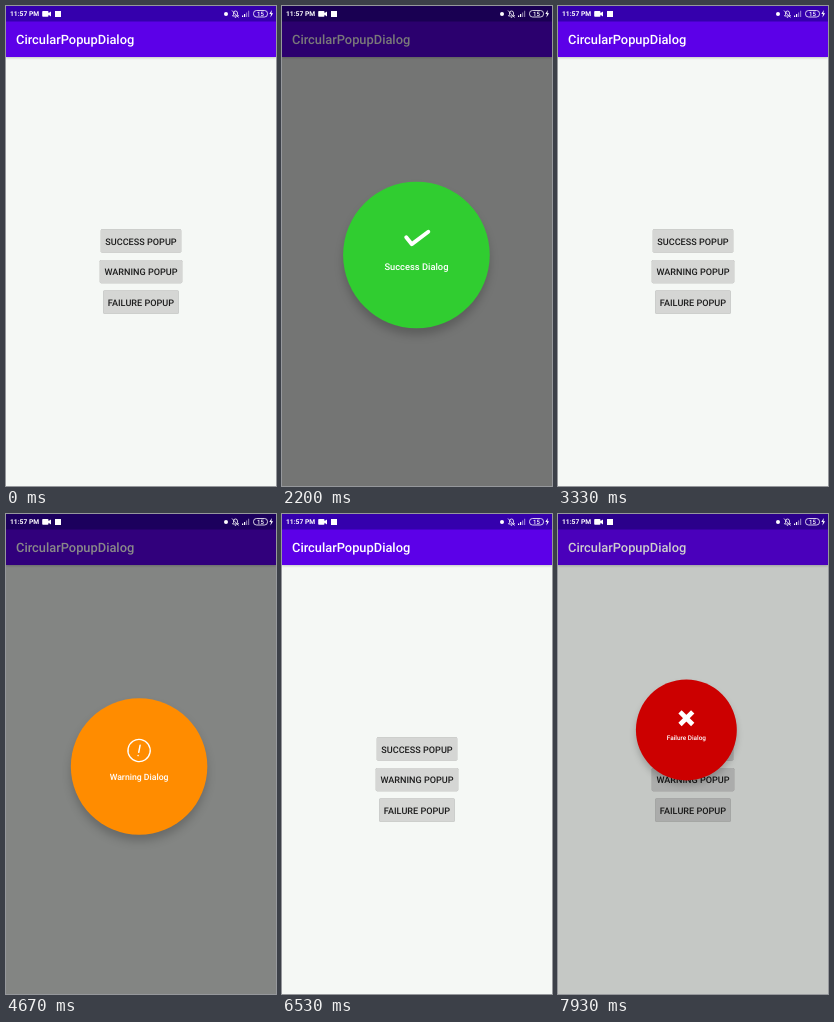
These frames come from a looping animation (270 by 480 pixels, 8000 ms). An HTML page:

```html
<!DOCTYPE html>
<html lang="en">
<head>
<meta charset="utf-8">
<title>Circular popup dialogs</title>
<style>
  html, body { margin: 0; width: 100%; height: 100%; overflow: hidden; background: #f5f8f5; }
  svg { display: block; width: 100%; height: 100%; font-family: Roboto, sans-serif; font-weight: 500; text-rendering: geometricPrecision; }
  .button rect { fill: #d5d6d4; filter: drop-shadow(0 .7px .7px rgba(0, 0, 0, .35)); }
  .button text { font-size: 9.1px; fill: #1c1c1c; text-anchor: middle; }
  .bar { filter: drop-shadow(0 1px 1px rgba(0, 0, 0, .2)); }
  .disc { filter: drop-shadow(0 7px 4.5px rgba(0, 0, 0, .2)); }
  .dialog text { font-size: 9.6px; fill: #fff; text-anchor: middle; }
  .line { fill: none; stroke: #fff; }
</style>
</head>
<body>
<svg viewBox="0 0 270 480">
  <rect width="270" height="480" fill="#f5f8f5"/>
  <rect class="bar" y="15" width="270" height="36" fill="#5c00e8"/>
  <rect width="270" height="15.500" fill="#3500ad"/>
  <text x="10" y="38" font-size="12.850" fill="#fff">CircularPopupDialog</text>
  <g id="buttons"></g>
  <rect id="dim" width="270" height="480" opacity="0"/>

  <g id="status" fill="#fff">
    <text x="4" y="10.300" font-size="6.700" font-weight="700">11:57 PM</text>
    <path d="M37 5h4.500q1 0 1 1v1l2.500-1.600v5l-2.500-1.600v1q0 1-1 1H37q-.8 0-.8-.8V5.800q0-.8.8-.8z"/>
    <rect x="49" y="5" width="6" height="6"/>
    <circle cx="220" cy="8" r="2"/>
    <path class="line" stroke-width=".8" d="M226.500 10h6l-1-1.500V7q0-2-2-2t-2 2v1.500zM228.800 11.300h1.400M226 4.500l6.500 7"/>
    <path d="M236 9.500h1.200V11H236zM238 8h1.200v3H238z"/>
    <path opacity=".45" d="M240 6.500h1.200V11H240zM242 4.800h1.200V11H242z"/>
    <rect class="line" x="247.500" y="4.500" width="14" height="6.500" rx="3" stroke-width=".8"/>
    <text x="254.500" y="10" font-size="6" text-anchor="middle">15</text>
    <path d="M265.800 4l-2.500 4h1.700l-.6 3.500 2.700-4.300h-1.700z"/>
  </g>

  <g class="dialog" visibility="hidden">
    <circle class="disc" r="75.500" fill="#30cd30"/>
    <g class="icon"><path class="line" stroke-width="4" stroke-linecap="round" stroke-linejoin="round" d="M-10.500 .5L-4 7L11.500-7.500"/></g>
    <text y="15.400">Success Dialog</text>
  </g>
  <g class="dialog" visibility="hidden">
    <circle class="disc" r="75.500" fill="#ff8c00"/>
    <g class="icon">
      <circle class="line" r="12.300" stroke-width="1.500"/>
      <path class="line" stroke-width="1.600" stroke-linecap="round" d="M0-6V2M0 5.700v.1"/>
    </g>
    <text y="15.400">Warning Dialog</text>
  </g>
  <g class="dialog" visibility="hidden">
    <circle class="disc" r="75.500" fill="#cc0000"/>
    <g class="icon"><path class="line" stroke-width="7" d="M-9.500-9.500l19 19M-9.500 9.500l19-19"/></g>
    <text y="15.400">Failure Dialog</text>
  </g>
</svg>
<script>
const LOOP = 8000, ENTER = 300, EXIT = 415;
const popups = [
  { enter: 1952, exit: 2715 },
  { enter: 4464, exit: 5247 },
  { enter: 6903, exit: 7692 },
];
const dialogs = document.querySelectorAll('.dialog');
const dim = document.getElementById('dim');
const progress = (t, start, duration) => Math.min(1, Math.max(0, (t - start) / duration));

const labels = [['SUCCESS POPUP', 80.5, 223.3], ['WARNING POPUP', 82.5, 253.9], ['FAILURE POPUP', 75.5, 284.5]];
document.getElementById('buttons').innerHTML = labels.map(([label, w, y]) =>
  `<g class="button"><rect x="${135 - w / 2}" y="${y}" width="${w}" height="23.3" rx="1.4"/>
   <text x="135" y="${y + 15.3}">${label}</text></g>`).join('');

function draw(now) {
  const t = now % LOOP;
  let shade = 0;
  popups.forEach(({ enter, exit }, i) => {
    const into = progress(t, enter, ENTER);
    const out = progress(t, exit, EXIT);
    const missingIn = (1 - into) ** 2;
    const missingOut = out ** 2;
    const scale = 1 - missingIn - missingOut;
    // Rises into place, then leaves upwards
    const x = 135 - 20 * (1 - scale);
    const y = 247.5 + 52 * missingIn - 95 * missingOut;
    const dialog = dialogs[i];
    dialog.setAttribute('visibility', into > 0 && out < 1 ? 'visible' : 'hidden');
    dialog.setAttribute('transform', `translate(${x} ${y}) scale(${Math.max(scale, 0.001)})`);
    dialog.querySelector('.icon').setAttribute('transform', `translate(0 -17.7) rotate(${36 * (1 - into)})`);
    shade += 0.6 * (progress(t, enter - 115, 415) - progress(t, exit + 57, 271));
  });
  dim.setAttribute('opacity', shade);
}

const start = performance.now();
function tick() {
  draw(performance.now() - start);
  requestAnimationFrame(tick);
}
tick();
</script>
</body>
</html>
```
